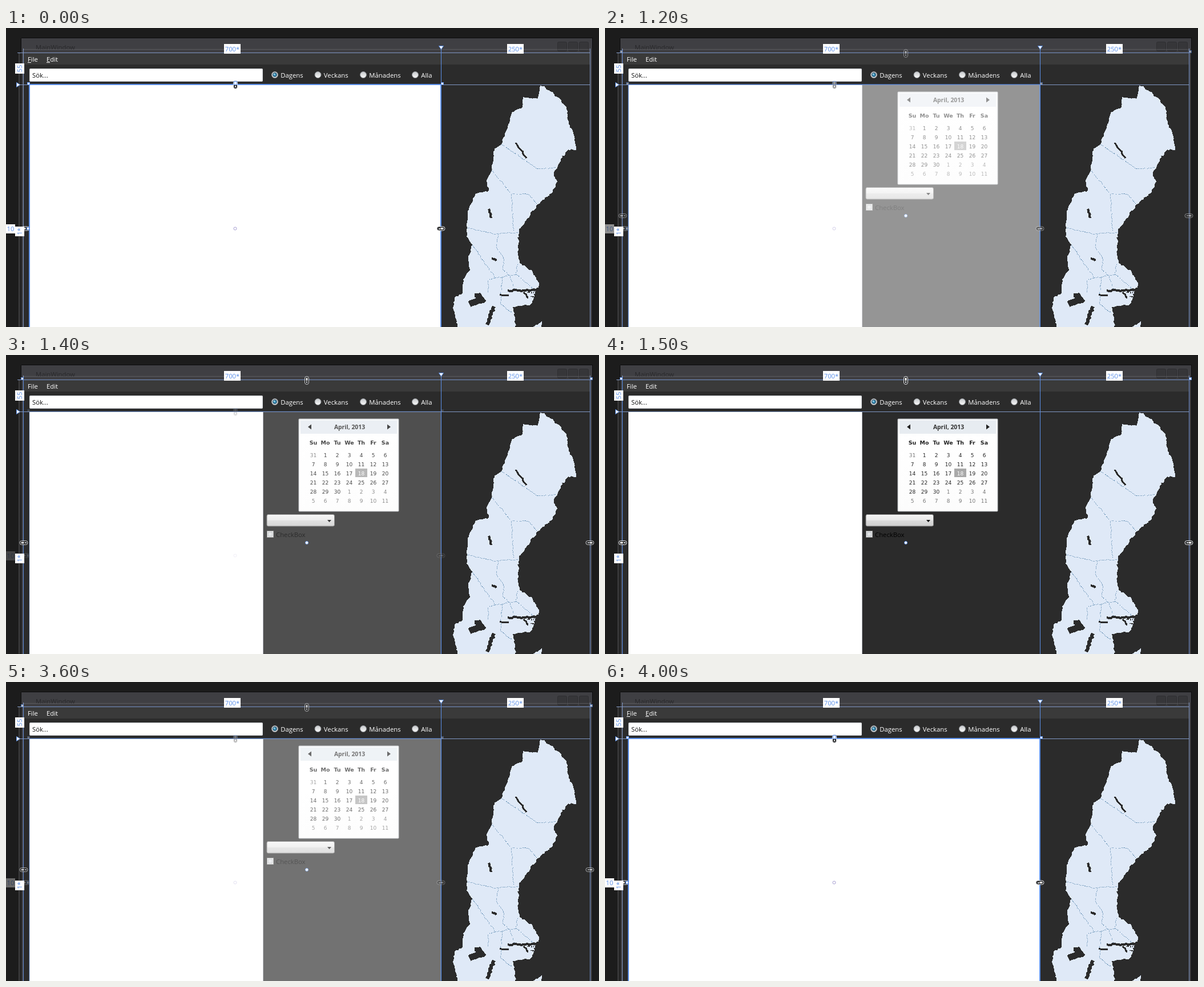
Write an HTML page that moves like this. It is 1039 px wide and 524 px high and loops after 5 s.

```html
<!DOCTYPE html>
<html lang="sv">
<head>
<meta charset="utf-8">
<title>Designer layout toggle</title>
<style>
html, body { margin: 0; width: 100%; height: 100%; overflow: hidden; background: #1c1c1c; }
svg { display: block; width: 100%; height: 100%; font: 11.3px "Open Sans", "Noto Sans", sans-serif; }
rect, line, .map { shape-rendering: crispEdges; }
.soft { shape-rendering: auto; }
.cal { font: 9px "DejaVu Sans", sans-serif; text-anchor: middle; fill: #222; }
.head { font-weight: bold; font-size: 9.5px; }
.title { font: bold 10.4px "Open Sans", sans-serif; text-anchor: middle; fill: #333; }
.tag { fill: #5b8fe8; text-anchor: middle; }
.map path { fill: none; }
.map .border { stroke: #4f80a8; stroke-dasharray: 1 1.5; }
.map .lake { stroke: #2b2b2b; }
.map .land { fill: #dfe9f7; }
</style>
</head>
<body>
<svg id="stage" viewBox="0 0 1039 524" xmlns="http://www.w3.org/2000/svg"></svg>
<script>
const BLUE = '#5b8fe8', GUIDE = '#8097c4', PANEL = '#2b2b2b';
const stage = document.getElementById('stage');

let seed = 7;
const random = () => (seed = (seed * 16807) % 2147483647) / 2147483647;
const spread = r => (random() * 2 - 1) * r;

const rect = (x, y, w, h, fill, more = '') =>
  `<rect x="${x}" y="${y}" width="${w}" height="${h}" fill="${fill}" ${more}/>`;
const line = (x1, y1, x2, y2, stroke, more = '') =>
  `<line x1="${x1}" y1="${y1}" x2="${x2}" y2="${y2}" stroke="${stroke}" ${more}/>`;
const path = (d, fill, more = '') => `<path d="${d}" fill="${fill}" ${more}/>`;
const text = (x, y, s, more = '') => `<text x="${x}" y="${y}" ${more}>${s}</text>`;
const group = (id, ...parts) => `<g id="${id}">${parts.join('')}</g>`;

// Joins key points with short, randomly displaced steps.
function rough(points, amp) {
  const keys = points.split(' ').map(s => s.split(',').map(Number));
  let d = 'M' + keys[0];
  for (let i = 1; i < keys.length; i++) {
    const [ax, ay] = keys[i - 1], [bx, by] = keys[i];
    const n = Math.ceil(Math.hypot(bx - ax, by - ay) / 3.5);
    for (let k = 1; k <= n; k++) {
      const a = k < n ? amp : 0;
      d += ` L${(ax + (bx - ax) * k / n + spread(a)).toFixed(1)},${(ay + (by - ay) * k / n + spread(a)).toFixed(1)}`;
    }
  }
  return d;
}

function map() {
  const west = '937,100 931,124 906,121 904,140 887,147 879,172 868,204 856,211 851,250 ' +
    '842,268 846,285 823,290 809,320 807,365 817,380 810,404 813,425 801,440 800,464 786,472 783,490 793,530';
  const east = '894,530 888,489 919,485 934,447 922,426 900,412 897,385 899,352 919,327 932,309 ' +
    '958,287 966,269 960,256 972,230 985,213 999,214 993,180 986,168 982,138 968,122 937,100';
  const borders = [
    '868,204 932,247 963,244', '851,250 886,291 915,291 930,308', '886,291 889,355',
    '809,350 855,361 899,358', '817,380 857,438 894,432 896,414', '862,360 859,384 872,404 871,424 882,433',
    '857,438 845,441 845,465', '882,433 892,459', '894,432 926,458', '870,436 866,484 888,500'
  ];
  const lakes = {
    3: ['893,201 912,228', '865,468 881,468', '907,463 915,473'],
    4: ['846,317 850,333', '851,404 859,408', '879,460 931,459'],
    6: ['843,520 855,488'],
    11: ['812,484 838,474', '826,465 834,482']
  };
  let s = path(rough(west, 1.1) + 'L' + rough(east, 1.6).slice(1) + 'Z', '', 'class="land"') +
    path(rough('920,526 939,514 938,526', 1), '', 'class="land"');
  for (const b of borders) s += path(rough(b, 1), '', 'class="border"');
  for (const width in lakes)
    for (const l of lakes[width]) s += path(rough(l, 1.2), '', `class="lake" stroke-width="${width}"`);
  for (let i = 0; i < 16; i++)
    s += rect(922 + spread(10), 464 + spread(9), 1 + random() * 3, 1 + random() * 2, PANEL);
  return `<g class="map">${s}</g>`;
}

function calendar() {
  const col = i => 538.5 + 21 * i;
  let s = rect(513, 112, 175, 162, 'url(#paper)', 'stroke="#b4b8bc" class="soft" rx="1"') +
    rect(516, 115, 169, 23, '#e7ecf1') +
    text(602, 130, 'April, 2013', 'class="title"') +
    path('M535,121.5 v9 l-6,-4.5Z M668,121.5 v9 l6,-4.5Z', '#222') +
    rect(612, 199, 21, 15, '#a9a9a9');
  'Su Mo Tu We Th Fr Sa'.split(' ').forEach((d, i) =>
    s += text(col(i), 157, d, 'class="cal head"'));
  for (let i = 0; i < 42; i++) {
    const day = i < 1 ? 31 : i > 30 ? i - 30 : i;
    const fill = i === 18 ? '#fff' : i < 1 || i > 30 ? '#777' : '#222';
    s += text(col(i % 7), 178.7 + 16 * Math.floor(i / 7), day, `class="cal" style="fill:${fill}"`);
  }
  return s;
}

const radio = (x, label, on) =>
  `<circle cx="${x}" cy="82" r="5.5" fill="url(#knob)" stroke="#8b8e92"/>` +
  (on ? `<circle cx="${x}" cy="82" r="3.4" fill="#3b8fb8" stroke="#1d3f55"/>
         <circle cx="${x - 1}" cy="81" r="1.3" fill="#a5dcef"/>` : '') +
  text(x + 10.3, 87, label, 'fill="#fff"');

const knob = (x, y) => rect(x - 2, y - 2, 4, 4, '#fff', `stroke="${BLUE}"`);

// Pill-shaped link marker on an edge.
const link = (x, y, turn = 0) => `<g transform="translate(${x} ${y}) rotate(${turn})">` +
  rect(-7, -3.5, 14, 7, PANEL, 'rx="3.5" class="soft" stroke="#e4e6ea"') +
  rect(-4.5, -1.5, 5, 3, '#fff', 'rx="1" class="soft"') +
  rect(1.5, -1, 3, 2, '#c8ccd2') + '</g>';

const tag = (x, y, w, h, label, turn) => {
  const cx = x + w / 2, cy = y + h / 2;
  return rect(x, y, w, h, '#fff') + text(cx, cy + 4, label,
    `class="tag" ${turn ? `transform="rotate(-90 ${cx} ${cy})"` : ''}`);
};

const dot = (x, y, stroke) => `<circle cx="${x}" cy="${y}" r="2.5" fill="#fff" stroke="${stroke}"/>`;

const gradient = (id, ...stops) =>
  `<linearGradient id="${id}" x2="0" y2="1">${stops.map(([o, c]) =>
    `<stop offset="${o}" stop-color="${c}"/>`).join('')}</linearGradient>`;

const frame =
  rect(0, 0, 1039, 524, '#1c1c1c') +
  rect(26, 17, 1002, 510, '#0c0c0d', 'rx="2"') +
  rect(27, 18, 1000, 510, '#3f3f43') +
  text(52, 38, 'MainWindow', 'fill="#28282a"') +
  [966, 985, 1004].map(x => rect(x + .5, 24.5, 16, 16, '#363639', 'rx="2" class="soft" stroke="#2e2e31"')).join('') +
  rect(31, 44, 993, 480, PANEL) +
  rect(31, 44, 993, 20, '#3a3a3a') +
  text(38, 59, 'File', 'fill="#fff"') + text(71, 59, 'Edit', 'fill="#fff"') +
  rect(41.5, 71.5, 408, 22, '#fff', 'rx="1" class="soft" stroke="#d2d5da"') +
  text(46, 87, 'Sök...', 'fill="#111"') +
  radio(471, 'Dagens', true) + radio(546.5, 'Veckans') +
  radio(626, 'Månadens') + radio(717, 'Alla') + map();

const controls =
  rect(41, 99, 409, 425, '#fff') + line(450.5, 99, 450.5, 524, '#a0a4aa') + calendar() +
  rect(457, 279.5, 118.5, 20.5, 'url(#button)', 'rx="2.5" class="soft" stroke="#777"') +
  path('M563,289 h7 l-3.5,4Z', '#111') +
  rect(457, 308, 11, 11, '#f4f4f4', 'stroke="#8e8f8f"') +
  rect(459, 310, 7, 7, '#e2e4e6', 'stroke="#b5b9bd"') +
  text(473, 319, 'CheckBox', 'fill="#000"') + dot(527, 329, BLUE);

const dotted = (...ends) => line(...ends, '#77777a', 'stroke-dasharray="1 1"');

const guides =
  dotted(31, 37.5, 1023, 37.5) + dotted(22.5, 44, 22.5, 524) + dotted(24.5, 44, 24.5, 524) +
  line(20, 43.5, 1024, 43.5, GUIDE) + line(22, 99.5, 1024, 99.5, GUIDE) +
  line(30.5, 36, 30.5, 524, GUIDE) + line(1023.5, 36, 1023.5, 524, GUIDE) +
  line(762.5, 37, 762.5, 524, BLUE) +
  path('M758.5,31.5 h8 l-4,6Z M18.5,95.5 v8 l6,-4Z', '#fff', `stroke="${BLUE}"`);

const boxMarks =
  rect(41, 99, 721, 440, 'none', `stroke="${BLUE}" stroke-width="2"`) +
  knob(39, 97) + knob(764, 97) + link(34, 351.5) + knob(38, 351) +
  link(762, 351.5, 180) + link(402, 99.5, 90) +
  rect(399, 93.5, 5, 6, '#fff', `stroke="${BLUE}"`) +
  dot(401.5, 351.5, '#a39bd0') + tag(0, 344, 16, 16, '10');

const gridMarks =
  line(30.5, 42, 30.5, 524, BLUE) + line(1023.5, 42, 1023.5, 524, '#6c8ccc') +
  line(30, 43.5, 1024, 43.5, '#7391c8') +
  knob(28, 41) + knob(1025, 41) + link(527, 44.5, 90) + link(31, 329) + link(1023, 329, 180);

stage.innerHTML = '<defs>' +
  gradient('paper', [0, '#f4f6f8'], [.2, '#fff'], [1, '#fcfcfc']) +
  gradient('button', [0, '#f4f4f4'], [.48, '#e9e9e9'], [.52, '#dbdbdb'], [1, '#cecece']) +
  gradient('knob', [0, '#c5c8cb'], [1, '#fafafa']) + '</defs>' +
  frame + controls +
  group('cover', rect(41, 99, 721, 425, '#fff')) + guides +
  group('boxMarks', boxMarks) + group('gridMarks', gridMarks) +
  group('keys', line(38, 60.5, 44, 60.5, '#fff'), line(71, 60.5, 77, 60.5, '#fff')) +
  tag(382, 28, 29, 17, '700*') + tag(878, 28, 29, 17, '250*') +
  tag(16, 62, 16, 18, '55', true) + tag(16, 348, 16, 17, '1*', true);

const [cover, boxLayer, gridLayer, keys] =
  ['cover', 'boxMarks', 'gridMarks', 'keys'].map(id => document.getElementById(id));

// Share of the covering box: fades in sixths, one step per 100 ms.
function coverage(t) {
  const steps = from => Math.min(6, Math.max(0, Math.floor((t - from) / 100) + 1));
  return 1 - (steps(1000) - steps(3500)) / 6;
}

function draw(t) {
  const p = coverage(t);
  cover.setAttribute('opacity', p);
  boxLayer.setAttribute('opacity', p);
  gridLayer.setAttribute('opacity', 1 - p);
  keys.setAttribute('opacity', p > .5 ? 1 : 0);
}

const start = performance.now();
function tick() {
  draw((performance.now() - start) % 5000);
  requestAnimationFrame(tick);
}
tick();
</script>
</body>
</html>
```
